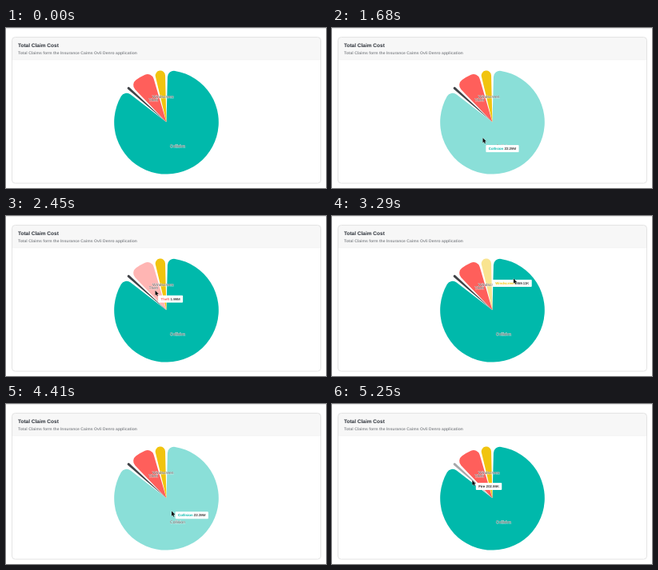
An HTML page that plays this animation: 400 by 201 pixels, repeating every 5.32 s.

```html
<!DOCTYPE html>
<html lang="en">
<head>
<meta charset="utf-8">
<title>Total Claim Cost</title>
<style>
  html, body { margin: 0; width: 100%; height: 100%; overflow: hidden; background: #fff; }
  svg { display: block; width: 100%; height: 100%; }
  text { font-family: "Liberation Sans", Arial, sans-serif; text-rendering: geometricPrecision; }
  .b { font-weight: bold; }
  .label { font-size: 5px; text-anchor: middle; fill: #555; stroke: #fff; stroke-width: .8; stroke-opacity: .65; paint-order: stroke; }
</style>
</head>
<body>
<svg viewBox="0 0 400 201">
  <rect width="400" height="201" fill="#fff"/>
  <rect width="400" height="1" fill="#e9e9e9"/>
  <rect x="7.5" y="11.5" width="386" height="183.5" rx="4" fill="#fff"/>
  <path d="M7.5 40V15.5a4 4 0 0 1 4-4h378a4 4 0 0 1 4 4V40z" fill="#f7f7f7"/>
  <path d="M7.5 39.8H393.5" stroke="#ececec" stroke-width=".6"/>
  <rect x="7.5" y="11.5" width="386" height="183.5" rx="4" fill="none" stroke="#dedede" stroke-width=".8"/>
  <text class="b" x="15" y="24.4" font-size="6.5" fill="#2b3038">Total Claim Cost</text>
  <text class="b" x="15" y="32.7" font-size="5.08" fill="#8b8e92">Total Claims form the Insurance Caims Ovli Denro application</text>
  <g id="pie" transform="translate(200.5 118.3)"></g>
  <g id="tip">
    <rect id="box" height="9" rx="1" fill="#fff"/>
    <text x="3.4" y="6.2" font-size="4.4"><tspan id="name" class="b"></tspan><tspan id="value" fill="#333" stroke="#333" stroke-width=".1"></tspan></text>
  </g>
  <path id="cursor" d="M0 0V6.2L1.4 4.9L2.4 7.2L3.4 6.8L2.5 4.6H4.4Z" fill="#111" stroke="#fff" stroke-width=".5" paint-order="stroke"/>
</svg>
<script>
const LOOP = 5320, STEP = 70, R = 65.3, PAD = 0.05, CORNER = 8;
const slices = [
  { name: 'Collision', text: '22.29M', value: 22290, color: '#00b9ab', label: true },
  { name: 'Fire', text: '202.99K', value: 203, color: '#404347', ink: '#222' },
  { name: 'Theft', text: '1.99M', value: 1990, color: '#ff5f5b', label: true },
  { name: 'Windscreen', text: '869.11K', value: 869, color: '#f1c40f', label: true }
];
// hovered slice, start and end
const hovers = [[0, 1470, 2310], [2, 2310, 2800], [3, 2800, 3360], [0, 3360, 4620], [1, 4620, LOOP + STEP]];
// pointer moves: start, end, from x, y, to x, y
const moves = [
  [1330, 1680, 192, 196, 188.5, 138],
  [2030, 2450, 188.5, 138, 186.5, 93.5],
  [2660, 2940, 186.5, 93.5, 197.3, 77],
  [3080, 3430, 197.3, 77, 243, 79.5],
  [3640, 4200, 243, 79.5, 211.5, 126],
  [4200, 4410, 211.5, 126, 207, 134.5],
  [4410, 4760, 207, 134.5, 177.5, 96.5],
  [4760, 4830, 177.5, 96.5, 176.3, 96],
  [5180, 5250, 176.3, 96, 175.3, 95.8]
];

const $ = id => document.getElementById(id);
const clamp = x => Math.max(0, Math.min(1, x));
const smooth = x => x * x * (3 - 2 * x);
const polar = (r, a) => [r * Math.sin(a), -r * Math.cos(a)];
const at = (r, a) => polar(r, a).map(v => v.toFixed(2)).join(' ');

function add(tag, attrs) {
  const el = document.createElementNS('http://www.w3.org/2000/svg', tag);
  for (const k in attrs) el.setAttribute(k, attrs[k]);
  return $('pie').appendChild(el);
}

// sector with rounded outer corners
function sector(a, b) {
  const s = Math.sin(Math.min((b - a) / 2, Math.PI / 2));
  const c = Math.min(CORNER, R * s / (1 + s));
  const turn = Math.asin(c / (R - c));
  const side = Math.sqrt((R - c) ** 2 - c * c);
  const big = b - a - 2 * turn > Math.PI ? 1 : 0;
  return `M0 0L${at(side, a)}A${c} ${c} 0 0 1 ${at(R, a + turn)}` +
    `A${R} ${R} 0 ${big} 1 ${at(R, b - turn)}A${c} ${c} 0 0 1 ${at(side, b)}Z`;
}

function buildPie() {
  const sum = slices.reduce((n, s) => n + s.value, 0);
  const scale = (2 * Math.PI - slices.length * PAD) / sum;
  let a = 0;
  for (const s of slices) {
    const b = a + s.value * scale + PAD;
    s.mid = (a + b) / 2;
    s.el = add('path', { d: sector(a + PAD / 2, b - PAD / 2), fill: s.color });
    a = b;
  }
  for (const s of slices.filter(s => s.label)) {
    const [x, y] = polar(R / 2, s.mid);
    add('text', { x, y: y + 1.7, class: 'label' }).textContent = s.name;
  }
}

function pointer(t) {
  let p = moves[0].slice(2, 4);
  for (const [from, to, x, y, u, v] of moves) {
    if (t < from) break;
    const k = smooth(clamp((t - from) / (to - from)));
    p = [x + (u - x) * k, y + (v - y) * k];
  }
  return p;
}

const place = (el, x, y) => el.setAttribute('transform', `translate(${x.toFixed(2)} ${y.toFixed(2)})`);
const show = (el, on) => el.setAttribute('visibility', on ? 'visible' : 'hidden');
const fade = (t, from) => clamp((t - from + STEP) / (2 * STEP));

function render(t) {
  slices.forEach((s, i) => {
    let lit = 0;
    for (const [k, from, to] of hovers) if (k === i) lit += fade(t, from) - fade(t, to);
    s.el.setAttribute('opacity', 1 - 0.54 * lit);
  });

  show($('cursor'), t >= 1400);
  place($('cursor'), ...pointer(t));

  const hover = hovers.find(([, from, to]) => t >= from && t < to);
  show($('tip'), hover);
  if (!hover) return;
  const s = slices[hover[0]];
  $('name').textContent = s.name;
  $('name').setAttribute('fill', s.ink || s.color);
  $('value').textContent = ' ' + s.text;
  $('box').setAttribute('width', $('name').parentNode.getComputedTextLength() + 6.8);
  // the box trails the pointer and stays put while leaving the thin slice
  const [x, y] = pointer(t >= 3080 && t < 3360 ? 3080 : t - STEP);
  place($('tip'), x + 3.5, y + 3);
}

function tick() {
  const t = performance.now() % LOOP;
  render(Math.floor(t / STEP) * STEP);
  requestAnimationFrame(tick);
}

buildPie();
tick();
</script>
</body>
</html>
```
